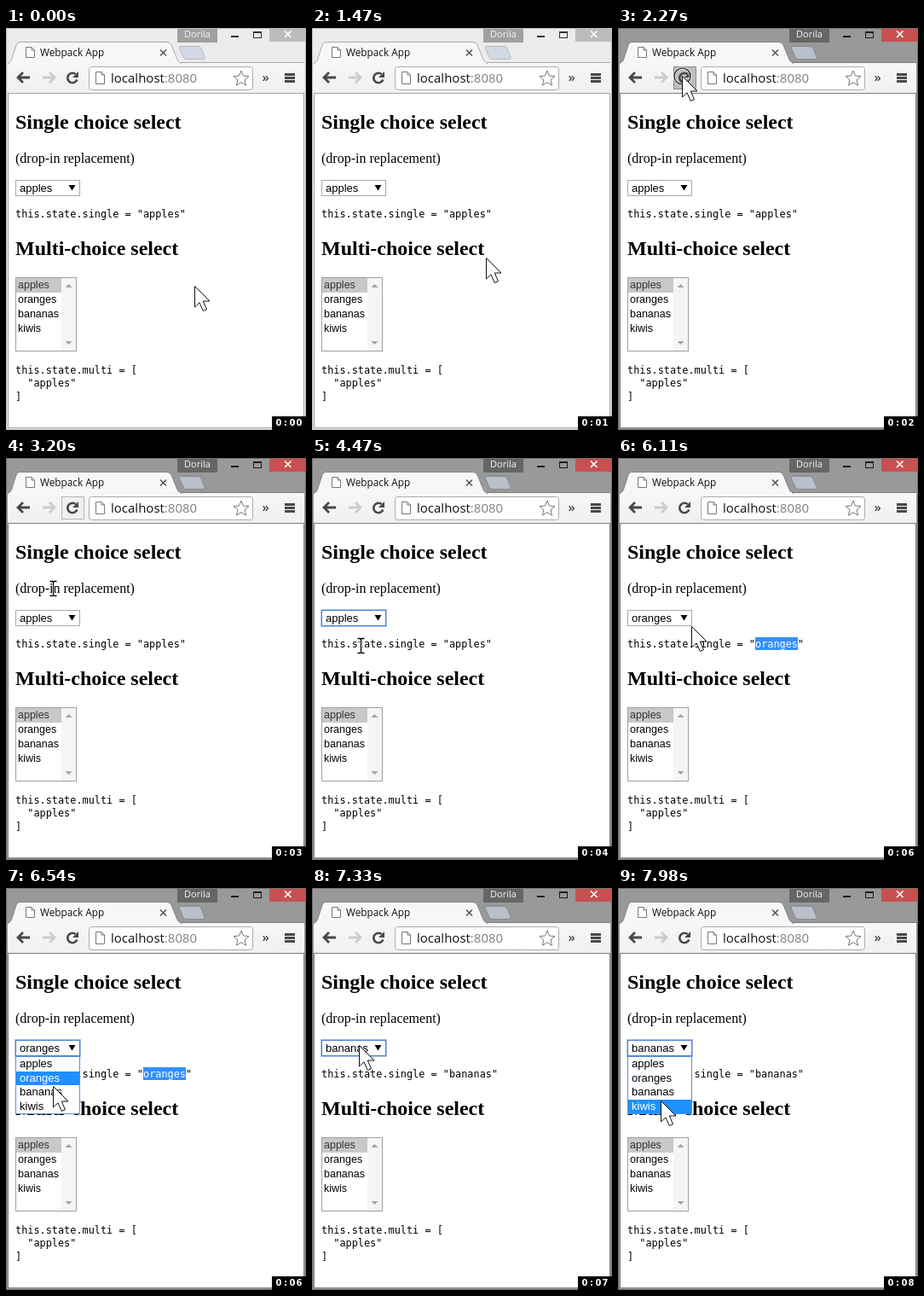
An HTML page with a canvas that plays this animation: 352 px wide and 471 px high, repeating every 8000 ms.

```html
<!DOCTYPE html>
<html lang="en">
<head>
<meta charset="utf-8">
<title>Select demo</title>
<style>
html, body { margin: 0; width: 352px; height: 471px; overflow: hidden; background: #fff; }
canvas { display: block; }
</style>
</head>
<body>
<canvas id="stage" width="352" height="471"></canvas>
<script>
const g = document.getElementById('stage').getContext('2d', { alpha: false });
const LOOP = 8000;
const FRUITS = ['apples', 'oranges', 'bananas', 'kiwis'];
const UI = '"Open Sans", sans-serif';
const ARIAL = '"Liberation Sans", Arial, sans-serif';
const SERIF = '"Liberation Serif", "Times New Roman", serif';
const MONO = '11.87px "DejaVu Sans Mono", monospace';

// Pointer path: time, x, y
const PATH = [
  [0, 221, 302], [270, 221, 302], [280, 221, 301], [490, 221, 301], [550, 221, 300],
  [1350, 221, 300], [1500, 200, 262], [1700, 130, 140], [1840, 84, 56], [1910, 77, 42], [2020, 75, 56],
  [3110, 75, 56], [3200, 55, 153], [3290, 55, 187],
  [3880, 55, 187], [4170, 57, 220],
  [4480, 57, 220], [4700, 88, 222], [5000, 185, 220], [5150, 197, 219],
  [5690, 197, 219], [5950, 130, 209], [6200, 62, 190],
  [6440, 62, 190], [6540, 55, 232], [6620, 55, 238],
  [7000, 55, 238], [7200, 55, 192], [7330, 55, 184],
  [7640, 55, 184], [7920, 50, 249], [LOOP, 50, 249]
];
const CLICKS = [[2270, 2400], [3440, 3600], [4410, 4450], [5210, 5370], [5510, 5690],
  [6270, 6400], [6780, 6880], [7550, 7640]];
const OPEN = [[3470, 4440], [6300, 6860], [7580, LOOP]];
const FOCUS = [[3440, 5210], [6270, LOOP]];

const within = (t, spans) => spans.some(([a, b]) => t >= a && t < b);
const inside = (p, x, y, w, h) => p.x >= x && p.x < x + w && p.y >= y && p.y < y + h;

function pointerAt(t) {
  const i = Math.max(1, PATH.findIndex(k => k[0] > t));
  const [t0, x0, y0] = PATH[i - 1], [t1, x1, y1] = PATH[i];
  const u = Math.max(0, (t - t0) / (t1 - t0));
  return { x: Math.round(x0 + (x1 - x0) * u), y: Math.round(y0 + (y1 - y0) * u) };
}

function box(x, y, w, h, fill, stroke) {
  if (fill) { g.fillStyle = fill; g.fillRect(x, y, w, h); }
  if (stroke) { g.strokeStyle = stroke; g.lineWidth = 1; g.strokeRect(x + .5, y + .5, w - 1, h - 1); }
}

function text(s, x, y, font, color = '#000', align = 'left') {
  g.font = font;
  g.fillStyle = color;
  g.textAlign = align;
  g.fillText(s, x, y);
}

function shape(d, fill, stroke, width = 1, x = 0, y = 0) {
  const p = new Path2D(d);
  g.save();
  g.translate(x, y);
  if (fill) { g.fillStyle = fill; g.fill(p); }
  if (stroke) { g.strokeStyle = stroke; g.lineWidth = width; g.stroke(p); }
  g.restore();
}

function ring(x, y, r, color, width, from = 0, to = 7) {
  g.beginPath();
  g.arc(x, y, r, from, to);
  g.strokeStyle = color;
  g.lineWidth = width;
  g.stroke();
}

function pageIcon(x, y, w, h) {
  shape(`M.5 .5H${w - 4}L${w - .5} 4V${h - .5}H.5ZM${w - 4} .5V4H${w - .5}`, '#fff', '#777', 1, x, y);
}

function star(cx, cy, r) {
  let d = '';
  for (let i = 0; i < 10; i++) {
    const a = i * Math.PI / 5, q = i % 2 ? r * .45 : r;
    d += (i ? 'L' : 'M') + (cx + q * Math.sin(a)) + ' ' + (cy - q * Math.cos(a));
  }
  shape(d + 'Z', '#fff', '#777');
}

function titleBar(active) {
  const ink = active ? '#1c1c1c' : '#333';
  box(201, 0, 47, 17, active ? '#666' : '#a0a0a0');
  text('Dorila', 224.5, 11, '11px ' + UI, '#f4f4f4', 'center');
  box(264, 9, 9, 2, ink);
  box(290, 4, 10, 8, null, ink);
  box(290, 4, 10, 2, ink);
  box(309, 0, 42, 16, active ? '#c75050' : '#bcbcbc');
  shape('M327 3.5L334.5 11M334.5 3.5L327 11', null, '#fff', 1.7);
}

function browser(t, p) {
  const active = t >= 2270;
  box(0, 0, 352, 471, active ? '#999' : '#ebebeb');
  titleBar(active);

  // Tab strip and toolbar
  shape('M204.5 21.5H225Q228 21.5 229 24L233 34Q234 36.5 231 36.5H212Q209 36.5 208 34L203.500 24Q202.500 21.5 204.5 21.5Z',
    active ? '#b9c0cc' : '#d3d9e4', active ? '#858a92' : '#b5b9c2');
  const bar = g.createLinearGradient(0, 40, 0, 76);
  bar.addColorStop(0, '#f7f7f7');
  bar.addColorStop(1, '#f0f0f0');
  box(2, 41, 348, 36, bar);
  box(2, 40, 348, 1, active ? '#7c7c7c' : '#aaa');
  shape('M2 41.5Q5 41 6.5 37L12 20Q13 16.5 16 16.5H189Q192.5 16.5 194 20L201 37Q202.5 41 206 41.5', '#f7f7f7',
    active ? '#858585' : '#aaa');
  box(4, 40, 200, 2, '#f7f7f7');
  pageIcon(23, 22, 11, 13);
  text('Webpack App', 40, 33, '11.8px ' + UI, '#111');
  shape('M181 25.5L188 32.5M188 25.5L181 32.5', null, '#555', 1.6);

  // Navigation buttons
  shape('M7 -6L1 0L7 6M1 0H15', null, '#484848', 2.8, 13, 58);
  shape('M-7 -6L-1 0L-7 6M-1 0H-15', null, '#cbcbcb', 2.8, 58, 58);
  const pressed = t >= 2270 && t < 2400;
  if (pressed) box(65, 45, 27, 27, '#bdbdbd', '#888');
  else if (inside(p, 65, 45, 27, 27) || (t > 3110 && t < 3240)) box(65, 45, 27, 27, '#f0f0f0', '#b5b5b5');
  ring(78, 58.5, 5.7, '#484848', 2.6, .35, 5.4);
  shape('M85 51V58H78Z', '#484848');

  // Address bar
  g.beginPath();
  g.roundRect(97.5, 45.5, 192, 27, 3);
  g.fillStyle = '#fff';
  g.fill();
  g.strokeStyle = '#ababab';
  g.lineWidth = 1;
  g.stroke();
  pageIcon(105, 51, 11, 15);
  text('localhost', 123, 64, '15px ' + UI, '#111');
  const host = g.measureText('localhost').width;
  text(':8080', 123 + host, 64, '15px ' + UI, '#808080');
  star(276, 59.5, 9.5);
  text('»', 300.5, 63, '600 15px ' + UI, '#444');
  for (let i = 0; i < 3; i++) box(327, 53 + i * 4, 12, 3, '#484848');

  box(2, 76, 348, 393, '#fff', active ? '#7f7f7f' : '#a5a5a5');
  box(0, 0, 352, 471, null, active ? '#707070' : '#bbb');
}

function listBox() {
  box(11, 292, 72, 87, '#fff', '#a0a0a0');
  box(12, 293, 53, 17, '#c8c8c8');
  box(65, 293, 17, 85, '#f5f5f5');
  shape('M69.5 304L73.5 300L77.5 304Z', '#a3a3a3');
  shape('M69.5 367L73.5 371L77.5 367Z', '#a3a3a3');
  FRUITS.forEach((f, i) => text(f, 14, 305 + 17 * i, '12.5px ' + ARIAL, i ? '#000' : '#333'));
}

function page(t, p, open) {
  const value = t < 4500 ? 0 : t < 6860 ? 1 : 2;
  const label = '13px ' + ARIAL;
  text('Single choice select', 11, 118, 'bold 24px ' + SERIF);
  text('(drop-in replacement)', 11, 158, '16px ' + SERIF);
  text('Multi-choice select', 11, 266, 'bold 24px ' + SERIF);

  text(`this.state.single = "${FRUITS[value]}"`, 11, 222, MONO);
  if (t >= 5530 && t < 6860) {
    box(161, 210, 50, 15, '#3390ff');
    text(FRUITS[value], 161, 222, MONO, '#fff');
  }
  ['this.state.multi = [', '  "apples"', ']'].forEach((s, i) => text(s, 11, 405 + 15.3 * i, MONO));
  listBox();

  const hover = inside(p, 11, 178, 76, 19);
  const focus = within(t, FOCUS);
  if (focus) box(10, 177, 78, 21, '#a9c6ee');
  box(11, 178, 76, 19, '#fff', focus ? '#4a80cc' : hover ? '#777' : '#a9a9a9');
  text(FRUITS[value], 16, 192, label);
  shape('M73.5 184H81.5L77.5 190.5Z', '#000');

  if (open) {
    // The highlighted row trails the pointer slightly
    const lagged = pointerAt(t - 40);
    const row = lagged.y < 198 ? value : Math.min(3, Math.floor((lagged.y - 198) / 16.6));
    box(11, 197, 76, 68, '#fff', '#5b8fd6');
    FRUITS.forEach((f, i) => {
      const top = Math.round(198 + 16.6 * i);
      if (i === row) box(12, top, 74, 16, '#1e90ff');
      text(f, 16, top + 12, label, i === row ? '#fff' : '#000');
    });
  }
}

function pointer(t, p, open) {
  const overText = !(open && inside(p, 11, 197, 76, 68)) && (
    inside(p, 11, 98, 194, 26) || inside(p, 11, 145, 140, 17) || inside(p, 11, 211, 207, 17) ||
    inside(p, 11, 246, 190, 26) || inside(p, 120, 46, 145, 26));
  if (within(t, CLICKS)) {
    ring(p.x + .5, p.y + .5, 9.5, 'rgba(255,255,255,.7)', 3);
    ring(p.x + .5, p.y + .5, 9.5, '#111', 1.2);
  }
  if (overText) {
    const beam = 'M-3.5 -8.5H-1Q0 -8.5 .5 -7.5Q1 -8.5 2 -8.5H4.5M.5 -7.5V7.5M-3.5 8.5H-1Q0 8.5 .5 7.5Q1 8.5 2 8.5H4.5';
    shape(beam, null, '#fff', 3, p.x, p.y);
    shape(beam, null, '#000', 1.3, p.x, p.y);
  } else {
    shape('M.5 .5V25L6 19.8L10.3 29.5L14.5 27.7L10.3 18H18Z', '#fff', '#111', 1, p.x, p.y);
  }
}

function clock(t) {
  const label = '0:0' + Math.floor((t + 20) / 1000);
  box(312, 455, 40, 16, '#000');
  [...label].forEach((c, i) =>
    text(c, 320 + 8 * i, 466, 'bold 10px "DejaVu Sans", sans-serif', '#fff', 'center'));
}

function draw() {
  const t = performance.now() % LOOP;
  const p = pointerAt(t);
  const open = within(t, OPEN);
  browser(t, p);
  page(t, p, open);
  pointer(t, p, open);
  clock(t);
  requestAnimationFrame(draw);
}
draw();
</script>
</body>
</html>
```
